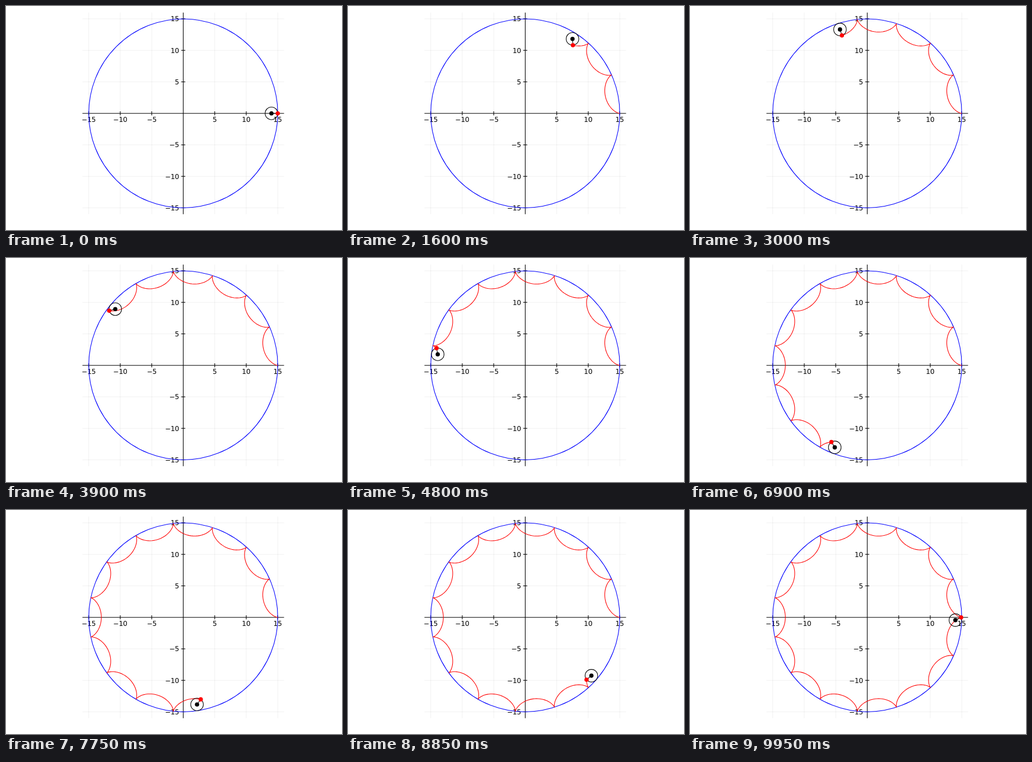
An HTML page with a canvas for the animation above (10000 ms loop, 600 by 400 pixels).

```html
<!DOCTYPE html>
<html lang="en">
<head>
<meta charset="utf-8">
<title>Hypocycloid</title>
<style>
html, body { margin: 0; width: 100%; height: 100%; overflow: hidden; background: #fff; }
canvas { display: block; width: 600px; height: 400px; }
</style>
</head>
<body>
<canvas id="stage" width="600" height="400"></canvas>
<script>
const ctx = document.getElementById('stage').getContext('2d');
const LOOP = 10000, STEP = 50, TAU = 2 * Math.PI;
const R = 15, LIMIT = 16, UNIT = 11.25, TICK = 3.6;
const px = x => 316.5 + x * UNIT;
const py = y => 191.7 - y * UNIT;

function line(x1, y1, x2, y2, color, width = 1.1) {
  ctx.strokeStyle = color;
  ctx.lineWidth = width;
  ctx.beginPath();
  ctx.moveTo(x1, y1);
  ctx.lineTo(x2, y2);
  ctx.stroke();
}

function ring(x, y, r, color) {
  ctx.strokeStyle = color;
  ctx.lineWidth = 1.1;
  ctx.beginPath();
  ctx.arc(px(x), py(y), r * UNIT, 0, TAU);
  ctx.stroke();
}

function dot([x, y], color) {
  ctx.fillStyle = color;
  ctx.beginPath();
  ctx.arc(px(x), py(y), 3.8, 0, TAU);
  ctx.fill();
}

const hub = a => [(R - 1) * Math.cos(a), (R - 1) * Math.sin(a)];
function pen(a) {
  const [x, y] = hub(a), spin = (R - 1) * a;
  return [x + Math.cos(spin), y - Math.sin(spin)];
}

function drawAxes() {
  const lo = -LIMIT, hi = LIMIT;
  for (let v = -15; v <= 15; v += 5) {
    line(px(v), py(lo), px(v), py(hi), 'rgba(0,0,0,.1)', 0.6);
    line(px(lo), py(v), px(hi), py(v), 'rgba(0,0,0,.1)', 0.6);
  }
  line(px(lo), py(0), px(hi), py(0), '#000');
  line(px(0), py(lo), px(0), py(hi), '#000');

  ctx.font = '12px "DejaVu Sans", sans-serif';
  ctx.fillStyle = '#000';
  for (let v = -15; v <= 15; v += 5) {
    if (!v) continue;
    const label = String(v).replace('-', '\u2212');
    line(px(v), py(0) - TICK, px(v), py(0) + TICK, '#000');
    line(px(0) - TICK, py(v), px(0) + TICK, py(v), '#000');
    ctx.textAlign = 'center';
    ctx.fillText(label, px(v), 207.4);
    ctx.textAlign = 'right';
    ctx.fillText(label, 309.2, py(v) + 4.4);
  }
}

function drawTrace(angle) {
  const n = Math.max(1, Math.ceil(angle / 0.01));
  ctx.strokeStyle = '#f00';
  ctx.lineWidth = 1.1;
  ctx.lineJoin = 'round';
  ctx.beginPath();
  for (let i = 0; i <= n; i++) {
    const [x, y] = pen(angle * i / n);
    ctx.lineTo(px(x), py(y));
  }
  ctx.stroke();
}

function draw() {
  const time = performance.now() % LOOP;
  const angle = TAU * Math.floor(time / STEP) * STEP / LOOP;
  const c = hub(angle), p = pen(angle);

  ctx.fillStyle = '#fff';
  ctx.fillRect(0, 0, 600, 400);
  drawAxes();
  ring(0, 0, R, '#00f');
  drawTrace(angle);
  ring(c[0], c[1], 1, '#000');
  line(px(c[0]), py(c[1]), px(p[0]), py(p[1]), '#000');
  dot(c, '#000');
  dot(p, '#f00');
  requestAnimationFrame(draw);
}
draw();
</script>
</body>
</html>
```
